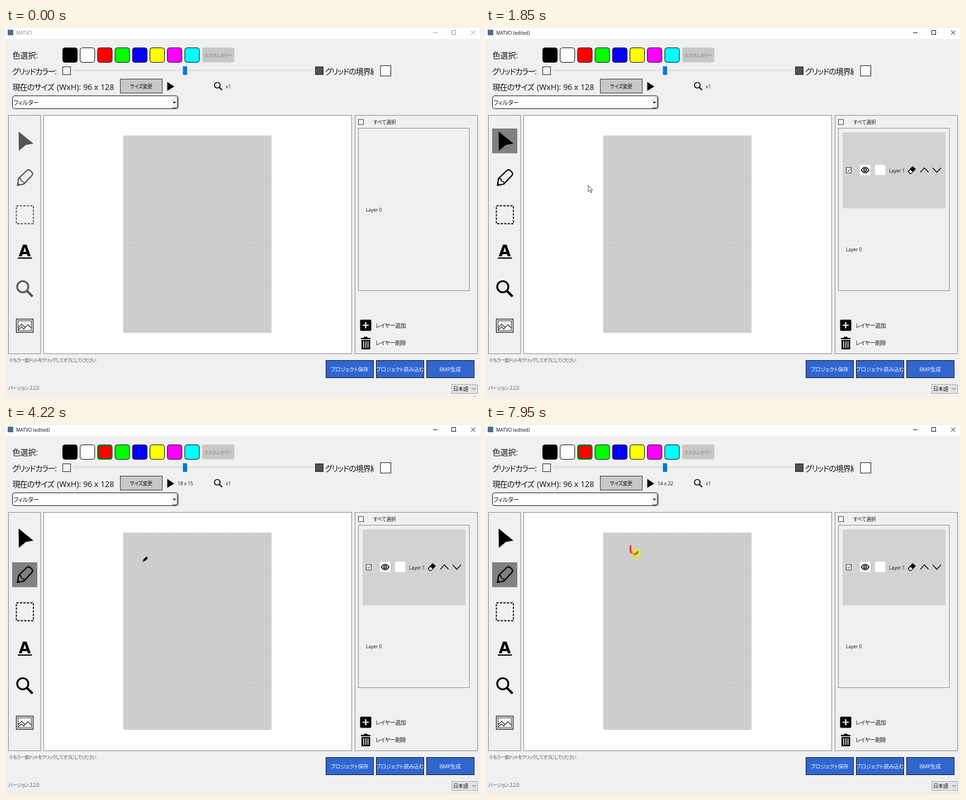
These frames come from a looping animation (848x661 px, 8 s). An HTML page:

```html
<!DOCTYPE html>
<html lang="ja">
<head>
<meta charset="utf-8">
<title>MATVO</title>
<style>
  html, body { margin: 0; width: 100%; height: 100%; overflow: hidden; background: #f0f0f0; }
  svg { display: block; width: 848px; height: 661px; --ink: #000; --ctl: #111; }
  svg.inactive { --ctl: #999; }
  svg.empty { --ink: #555; }
  svg.empty .layer, svg:not(.empty) .bare { display: none; }
  text { font-family: "Open Sans", "Noto Sans CJK JP", "Noto Sans CJK", sans-serif; font-feature-settings: "palt"; fill: #111; }
  .big { font-size: 14px; }
  .mid { font-size: 10px; letter-spacing: -.35px; }
  .btn { font-size: 9.5px; letter-spacing: -.3px; fill: #fff; text-anchor: middle; }
  .small { font-size: 8.4px; }
  .line { fill: none; stroke: #000; }
  .panel { stroke: #8a8a8a; }
  .tool { fill: none; stroke: var(--ink); }
  .solid { fill: var(--ink); }
  .ctl { fill: none; stroke: var(--ctl); }
</style>
</head>
<body>
<svg id="app" viewBox="0 0 848 661">
  <rect width="848" height="661" fill="#f0f0f0"/>

  <!-- title bar -->
  <rect width="848" height="19.5" fill="#fff"/>
  <rect x="3" y="3" width="10" height="10" fill="#4d6f8c"/>
  <text id="title" class="small" x="18" y="11.5"></text>
  <g class="ctl">
    <path d="M764 8.5h8"/>
    <rect x="797.5" y="4.5" width="7" height="7"/>
    <path d="M832 4.5l7.5 7.5M839.5 4.5l-7.5 7.5"/>
  </g>

  <!-- options -->
  <text class="big" x="11.5" y="54">色選択:</text>
  <g id="swatches" stroke="#000"></g>
  <rect id="chosen" x="164.9" y="36.5" width="24" height="24" rx="3" fill="#f00" stroke="#008000" stroke-width="2.4"/>
  <rect x="351" y="35" width="57.5" height="26.5" rx="3" fill="#c8c8c8"/>
  <text x="379.5" y="51.5" font-size="8.5" letter-spacing="-.6" text-anchor="middle" style="fill:#858585">カスタムカラー</text>

  <text class="big" x="11" y="82.5" letter-spacing="-1.25">グリッドカラー:</text>
  <rect x="101.5" y="69.5" width="14" height="14" fill="#f0f0f0" stroke="#222"/>
  <rect x="121" y="74.5" width="428" height="2.5" fill="#e7e7e7" stroke="#d8d8d8" stroke-width=".7"/>
  <rect x="316.5" y="68.5" width="7.5" height="15.5" fill="#0078d7"/>
  <rect x="553.5" y="69.5" width="14" height="14" fill="#505050" stroke="#222"/>
  <clipPath id="cut"><rect x="570" y="64" width="88" height="28"/></clipPath>
  <text class="big" x="571" y="82.5" letter-spacing="-1" clip-path="url(#cut)">グリッドの境界線</text>
  <rect x="670" y="67.5" width="18.5" height="18.5" fill="#fff" stroke="#111"/>

  <text class="big" x="11.5" y="110.5" letter-spacing="-.9">現在のサイズ</text>
  <text x="91" y="110.5" font-size="14.2">(WxH): 96 x 128</text>
  <rect x="204.5" y="91.5" width="75" height="25" fill="#c8c8c8" stroke="#333"/>
  <text x="241.5" y="107.5" font-size="9" letter-spacing="-.5" text-anchor="middle">サイズ変更</text>
  <path d="M288.5 96.5L301 105L288.5 112.5Z"/>
  <text id="coords" class="small" x="307" y="107.7"></text>
  <g class="line">
    <circle cx="378" cy="102.5" r="5" stroke-width="1.7"/>
    <path d="M381.5 106l5 5" stroke-width="2.2"/>
  </g>
  <text class="small" x="393" y="107.7">x1</text>

  <rect x="11.5" y="121.5" width="296.5" height="23" rx="4" fill="#fff" stroke="#111"/>
  <path d="M297 123h8v20h-8z" fill="#f0f0f0"/>
  <path d="M306.5 124v19h-9" fill="none" stroke="#666" stroke-width="1.4"/>
  <path d="M298.5 132h5.5l-2.75 3.2z"/>
  <text x="13" y="137.5" font-size="11" letter-spacing="-.5">フィルター</text>

  <!-- tools -->
  <rect class="panel" x="4.5" y="156.5" width="57.5" height="427" fill="none"/>
  <rect id="picked" x="11" y="180" width="45" height="44.5" fill="#808080"/>
  <path class="solid" d="M22.5 185.5L49 207L35.5 209.5L23 220Z"/>
  <g class="tool" stroke-width="2.2" stroke-linejoin="round">
    <path d="M20.5 282L22.5 269.5L37 255.5Q40.5 252.5 43.5 255.5L46.5 258.5Q49 261.5 46 264.5L32 279.5Z"/>
    <path d="M22.500 269.500q4-.5 4.500 2.500q-.2 3 3 3q3 .5 2 4.500" stroke-width="1.7"/>
    <path class="solid" d="M20.5 282l.7-4.500l3.700 3.700z" stroke-width="1"/>
  </g>
  <rect class="tool" x="18.5" y="318.5" width="30.5" height="32" stroke-width="1.8" stroke-dasharray="4 2.25"/>
  <text x="33.5" y="408.500" font-size="28" font-weight="700" text-anchor="middle" style="font-family:'DejaVu Sans',sans-serif;fill:#000">A</text>
  <path d="M21 411h25.5v2.200H21z"/>
  <g class="tool">
    <circle cx="30" cy="463.5" r="10" stroke-width="3.2"/>
    <path d="M37.5 471l10 10" stroke-width="4"/>
  </g>
  <g fill="none" stroke="#222">
    <rect x="18.5" y="521.5" width="30" height="23.5" stroke-width="1.4"/>
    <rect x="21.5" y="524.5" width="24" height="17.5" stroke-width=".9"/>
    <path d="M22 536.500l6-6l6 6l5-5l6.500 6M22 540.500l6-5l4 4l2-3" stroke-width="1.1"/>
  </g>

  <!-- drawing area -->
  <rect class="panel" x="67.5" y="156.5" width="551" height="427" fill="#fff"/>
  <rect x="210.3" y="193.4" width="264" height="352" fill="#f0f0f0"/>
  <path id="grid" fill="none" stroke="#a0a0a0" stroke-width=".69"/>
  <path id="trail" fill="#f00"/>

  <!-- layers -->
  <rect class="panel" x="624.5" y="156.5" width="219" height="427" fill="none"/>
  <rect x="630.5" y="164" width="9" height="9" fill="#fff" stroke="#333"/>
  <text x="657" y="172.3" font-size="8.6">すべて選択</text>
  <rect class="panel" x="630.5" y="179.5" width="198.5" height="291" fill="none"/>
  <text class="small bare" x="644" y="328.5">Layer 0</text>
  <g class="layer">
    <rect x="638" y="187" width="184" height="136" fill="#d2d2d2"/>
    <rect x="644.5" y="250" width="9" height="9.5" fill="#fff" stroke="#333"/>
    <path class="line" d="M646.5 254.7l2 2l3.5-4.3"/>
    <path d="M669 245h18.500v18.500H669zM696 245h18.500v18.500H696z" fill="#fff"/>
    <path class="line" d="M671.5 254.5Q678.3 244.5 685 254.5Q678.3 264.5 671.5 254.5Z" stroke-width="1.6"/>
    <circle class="line" cx="678.3" cy="254.5" r="2.3" stroke-width="1.7"/>
    <text class="small" x="721" y="258.5">Layer 1</text>
    <path d="M754.5 257l8.500-9.500l6 5l-8.500 9h-2.500z"/>
    <path d="M756.5 257l3-3l3.500 3.500l-2.800 2.700h-1.500z" fill="#fff"/>
    <path class="line" d="M777 258.500l7.300-8l7.300 8M799 250.500l7.500 8l7.500-8" stroke-width="1.4"/>
    <text class="small" x="644" y="399.5">Layer 0</text>
  </g>
  <rect x="633.5" y="522.5" width="20" height="20" rx="2"/>
  <path d="M638 532.5h11M643.5 527v11" stroke="#fff" stroke-width="2.2"/>
  <text class="mid" x="661" y="536.5">レイヤー追加</text>
  <path d="M635 555h5l1-2h5l1 2h5v2.500h-17zM636 559h15.500v16.500H636z"/>
  <path d="M640 561v12M643.800 561v12M647.600 561v12" stroke="#f0f0f0" stroke-width="1.7"/>
  <text class="mid" x="661" y="568">レイヤー削除</text>

  <!-- footer -->
  <text x="5" y="597.5" font-size="8.3" letter-spacing="-.8" style="fill:#555">※もう一度ドットをクリックしてオフにしてください</text>
  <text x="4" y="647.5" font-size="8.5" letter-spacing="-.4" style="fill:#555">バージョン 2.2.0</text>
  <g fill="#2f66d0" stroke="#111">
    <rect x="572.5" y="595.5" width="85" height="31"/>
    <rect x="662.5" y="595.5" width="85" height="31"/>
    <rect x="752.5" y="595.5" width="85" height="31"/>
  </g>
  <text class="btn" x="614.5" y="614.8">プロジェクト保存</text>
  <text class="btn" x="705" y="614.8">プロジェクト読み込む</text>
  <text class="btn" x="794.5" y="614.8">BMP生成</text>
  <rect x="797.5" y="638.5" width="46" height="16" fill="#e3e3e3" stroke="#adadad"/>
  <text x="800" y="650" font-size="9">日本語</text>
  <path d="M834.5 645l3 3l3-3" fill="none" stroke="#444"/>

  <!-- pointer -->
  <g id="pointer">
    <path id="arrow" d="M.5 .5V12L3.200 9.500L5.200 14L6.900 13.200L5 9H8.500Z" fill="#fff" stroke="#222" stroke-width=".8"/>
    <g id="pen">
      <path d="M-4.500 4.500L-3.500 .8L1.500 -4.200Q2.500 -4.800 3.300 -4L4.300 -3Q4.900 -2 4.200 -1.200L-.8 3.600Z"/>
      <path d="M-3 1.500l1.500 1.500" stroke="#ddd" stroke-width=".8"/>
    </g>
    <circle id="press" r="9" fill="#f0eb1e" fill-opacity=".6"/>
  </g>
</svg>
<script>
  const $ = id => document.getElementById(id);
  const LOOP = 8000, STEP = 69.1;
  const CELL = 2.75, LEFT = 210.3, TOP = 193.4, COLS = 96, ROWS = 128;
  const ADDED = 740, RED = 2950, PEN = 3560, DRAW = 6765;
  const presses = [[600, 745], [2860, 2950], [3450, 3560], [DRAW, LOOP]];

  // time, x, y of the pointer
  const route = [
    [0, 838, 659.5], [200, 790, 616], [420, 712, 556], [620, 676, 533], [829, 674, 530],
    [1040, 664, 420], [1244, 640, 278], [1420, 450, 272], [1590, 316, 284], [1650, 316, 284],
    [1950, 130, 280], [2140, 45, 262], [2300, 62, 200], [2488, 138, 119],
    [2760, 175, 52], [2950, 177, 50], [3110, 90, 150], [3248, 40, 234],
    [3400, 37, 262], [3560, 37, 264], [3900, 140, 254], [4215, 249, 240.5], [5330, 249, 240.5],
    [5940, 257.4, 218.4], [6500, 257.4, 218.4], [6630, 257.4, 216.4], [6920, 257.4, 216.4],
    [7190, 258.4, 224.3], [7390, 260.4, 230], [7680, 260.4, 230], [7945, 269, 230]
  ];

  function at(t) {
    const i = route.findIndex(p => p[0] > t);
    if (i < 0) return route[route.length - 1].slice(1);
    const [a, x, y] = route[i - 1], [b, u, v] = route[i];
    const k = (t - a) / (b - a);
    return [x + (u - x) * k, y + (v - y) * k];
  }

  const cellOf = ([x, y]) => [Math.floor((x - LEFT) / CELL), Math.floor((y - TOP) / CELL)];

  function trail(t) {
    const cells = new Set();
    for (let s = DRAW; s <= t; s += 8) cells.add(cellOf(at(s)).join());
    return [...cells].map(c => {
      const [col, row] = c.split(",");
      return `M${LEFT + col * CELL + .1} ${TOP + row * CELL + .1}h2.55v2.55h-2.55z`;
    }).join("");
  }

  const show = (id, on) => $(id).style.display = on ? "" : "none";

  const colors = ["#000", "#fff", "#f00", "#0f0", "#00f", "#ff0", "#f0f", "#0ff"];
  $("swatches").innerHTML = colors.map((c, i) =>
    `<rect x="${101.5 + i * 31.2}" y="35.5" width="26" height="26" rx="4" fill="${c}"/>`).join("");

  let lines = "";
  for (let i = 0; i <= COLS; i++) lines += `M${LEFT + i * CELL} ${TOP}v${ROWS * CELL}`;
  for (let i = 0; i <= ROWS; i++) lines += `M${LEFT} ${TOP + i * CELL}h${COLS * CELL}`;
  $("grid").setAttribute("d", lines);

  function draw() {
    const now = performance.now() % LOOP;
    const t = Math.floor(now / STEP + .25) * STEP;
    const pos = at(t), [x, y] = pos, [col, row] = cellOf(pos);
    const onGrid = col >= 0 && col < COLS && row >= 0 && row < ROWS;
    const drawing = t >= PEN && x > 67 && x < 618 && y > 156 && y < 583;

    $("app").classList.toggle("inactive", t < presses[0][0]);
    $("app").classList.toggle("empty", t < ADDED);
    $("title").textContent = t < ADDED ? "MATVO" : "MATVO (edited)";
    $("title").style.fill = t < presses[0][0] ? "#888" : "#111";
    $("coords").textContent = onGrid ? `${row + 1} x ${col + 1}` : "";

    show("picked", t >= ADDED);
    $("picked").setAttribute("y", t < PEN ? 180 : 246);
    show("chosen", t >= RED);

    $("trail").setAttribute("d", trail(t));
    $("pointer").setAttribute("transform", `translate(${x} ${y})`);
    show("arrow", !drawing);
    show("pen", drawing);
    show("press", presses.some(([a, b]) => t >= a && t < b));
    requestAnimationFrame(draw);
  }
  draw();
</script>
</body>
</html>
```
